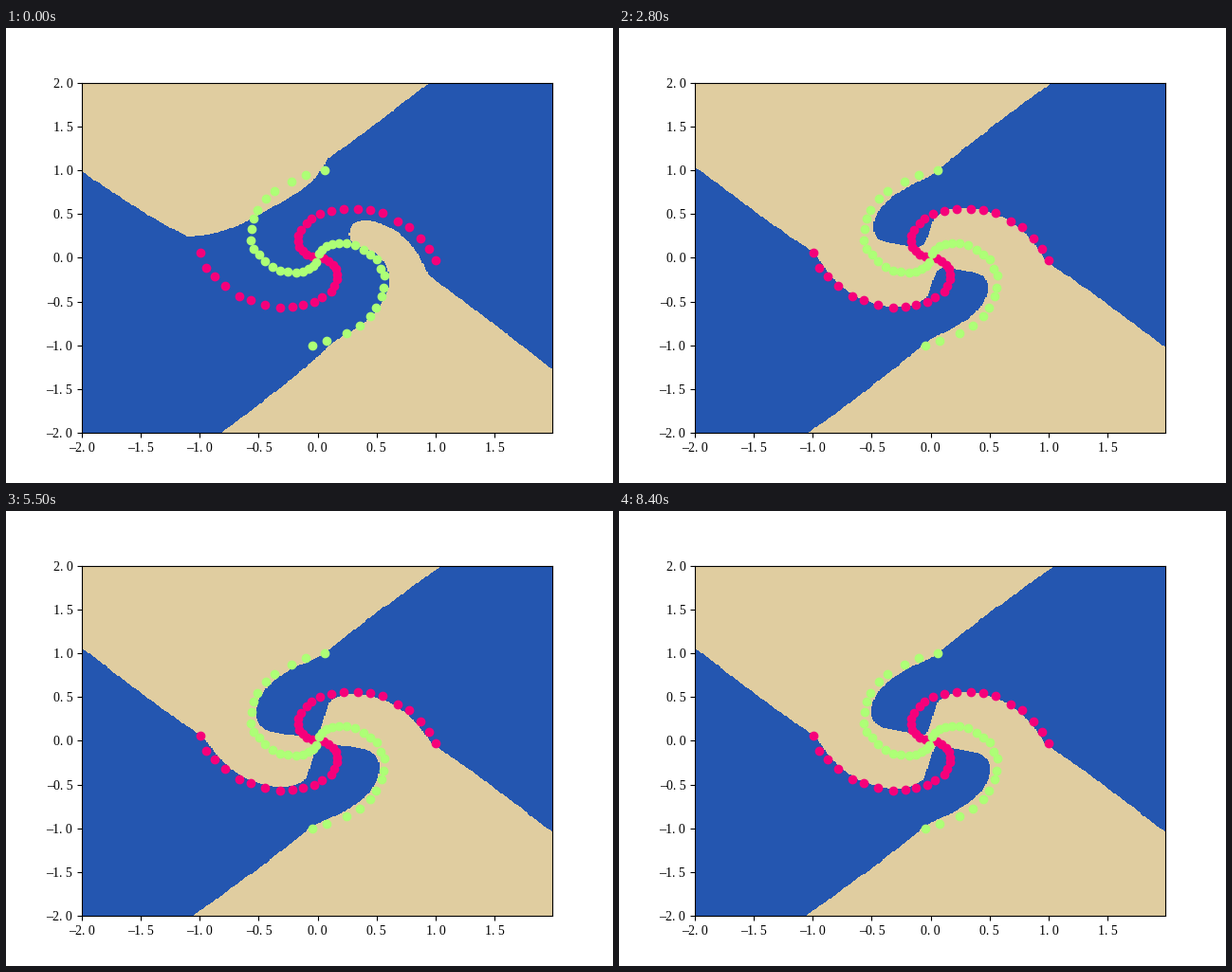
Recreate the animation shown at these times as a matplotlib script. Size 640 by 480 pixels, loop 8.5 s.

```python
import numpy as np
import matplotlib.pyplot as plt
from matplotlib.animation import FuncAnimation
from matplotlib.colors import ListedColormap

FRAMES, STEP = 170, 50
BLUE, KHAKI, RED, GREEN = "#2456b0", "#e0cda0", "#f6007a", "#adff76"
XMAX = 1.99

# Time in ms, inner radius of the blue lobes, outward bend of the rays
KEYS = [(950, 0.58, 0.667), (1950, 0.155, 0.73), (3700, 0.155, 0.745),
        (5500, 0.015, 0.755), (6350, 0.015, 0.755), (8400, 0.09, 0.755)]
START = KEYS[0][0]

plt.rcParams["font.family"] = "Liberation Serif"

x, y = np.meshgrid(np.linspace(-2, XMAX, 400), np.linspace(-2, 2, 400))
radius = np.maximum(np.hypot(x, y), 1e-3)
angle = np.arctan2(x, y)  # clockwise from the top


def smoothstep(lo, hi, v):
    u = np.clip((v - lo) / (hi - lo), 0, 1)
    return u * u * (3 - 2 * u)


def ray(bend):
    return 0.85 + bend * (1 - 1 / radius)


def axis(bend):
    """Angle of the blue lobe's middle line: a ray outside, a twist inside."""
    return -0.55 + (ray(bend) + 0.55) * smoothstep(0.38, 1.0, radius)


def two_lobes(middle, bias):
    """Positive in two opposite blue lobes; bias widens or narrows them."""
    return np.cos(2 * (angle - middle)) - np.clip(bias, -1.5, 1.5)


def learned(tip, bend):
    return two_lobes(axis(bend), tip / radius * (1 - smoothstep(0.8, 1.02, radius)))


def untrained():
    """Blue centre with a hooked region below and a blunt one above."""
    middle = axis(0.75)
    below = two_lobes(middle, -0.34 / radius)
    above = two_lobes(np.maximum(ray(0.7), 0.93), -(0.69 / radius) ** 4)
    return np.where(np.sin(angle - middle) > 0, below, above)


def state(t):
    for (t0, *a), (t1, *b) in zip(KEYS, KEYS[1:]):
        if t <= t1:
            break
    w = min((t - t0) / (t1 - t0), 1)
    w = 1 - (1 - w) ** 2
    return [p + (q - p) * w for p, q in zip(a, b)]


opening = untrained(), learned(*KEYS[0][1:])


def field(t):
    if t < START:
        first, last = opening
        return first + (last - first) * t / START
    return learned(*state(t))


def label(v, _=None):
    return f"{v:.1f}".replace("-", "\u2013").replace(".", ". ")


fig = plt.figure(figsize=(6.4, 4.8), dpi=100, facecolor="white")
ax = fig.add_subplot()
image = ax.imshow(field(0) > 0, cmap=ListedColormap([KHAKI, BLUE]), vmin=0, vmax=1,
                  extent=(-2, XMAX, -2, 2), aspect="auto", origin="lower",
                  interpolation="nearest", zorder=0.5)

# Four spiral arms, a quarter turn apart
rng = np.random.default_rng(4)
r = np.arange(1, 21) / 20
for turn, color in ((1, RED), (3, RED), (0, GREEN), (2, GREEN)):
    a = np.pi * (r + turn / 2) + rng.uniform(0.02, 0.08, r.size)
    ax.scatter(r * np.sin(a), r * np.cos(a), color=color, zorder=1)

ax.set_xlim(-2, XMAX)
ax.set_ylim(-2, 2)
ax.set_xticks(np.arange(-2, 1.6, 0.5))
ax.set_yticks(np.arange(-2, 2.1, 0.5))
ax.xaxis.set_major_formatter(label)
ax.yaxis.set_major_formatter(label)


def update(i):
    image.set_data(field(i * STEP) > 0)
    return (image,)


anim = FuncAnimation(fig, update, frames=FRAMES, interval=STEP,
                     repeat=True, repeat_delay=0)
plt.show()
```
